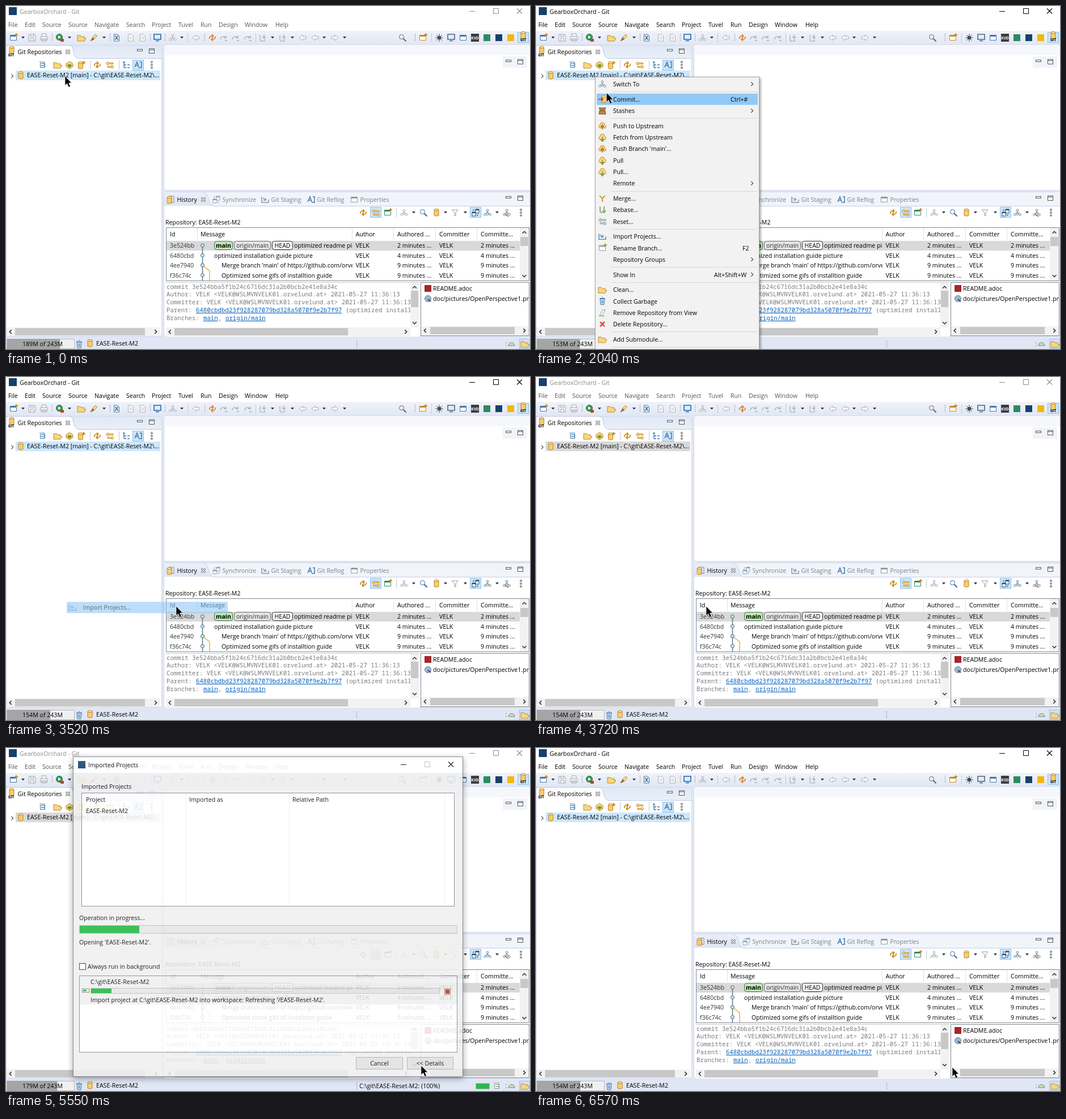
An HTML page that plays this animation: 924x606 px, repeating every 6.77 s.

```html
<!DOCTYPE html>
<html lang="en">
<head>
<meta charset="utf-8">
<title>Import projects</title>
<style>
html, body { margin: 0; width: 100%; height: 100%; overflow: hidden; background: #fff; }
svg#stage { display: block; width: 100vw; height: 100vh; }
text { font: 10.6px "Open Sans", "Noto Sans", sans-serif; white-space: pre; }
.b { font-weight: 700; }
.h { font-size: 11.4px; font-weight: 700; }
.m { font: 10.72px "Noto Sans Mono", monospace; }
.u { text-decoration: underline; }
.tiny { font-size: 6.5px; font-weight: 700; }
#menu { filter: drop-shadow(2px 2px 2px #0006); }
#wizard, #progress { filter: drop-shadow(0 3px 6px #0006); }
</style>
</head>
<body>
<svg id="stage" viewBox="0 0 924 606" xmlns="http://www.w3.org/2000/svg"></svg>
<script>
const LOOP = 6770, REPO = 'EASE-Reset-M2', USER = 'VELK', NAVY = '#17406b';
const GRAY = '#a6abb0', BLUE = '#3f78ad', GOLD = '#c98a1b';

// drawing helpers
const esc = s => s.replace(/&/g, '&amp;').replace(/</g, '&lt;');
const text = (x, y, s, fill = '#000', cls = '', more = '') =>
  `<text x="${x}" y="${y}" fill="${fill}" class="${cls}" ${more}>${esc(s)}</text>`;
const mid = (x, y, s, fill, cls) => text(x, y, s, fill, cls, 'text-anchor="middle"');
const rect = (x, y, w, h, fill, stroke = 'none', more = '') => {
  const o = stroke === 'none' ? 0 : .5;
  return `<rect x="${x + o}" y="${y + o}" width="${w - 2 * o}" height="${h - 2 * o}" fill="${fill}" stroke="${stroke}" ${more}/>`;
};
const path = (d, stroke = '#000', fill = 'none', w = 1, more = '') =>
  `<path d="${d}" stroke="${stroke}" fill="${fill}" stroke-width="${w}" ${more}/>`;
const dot = (x, y, r, fill, stroke = 'none') =>
  `<circle cx="${x}" cy="${y}" r="${r}" fill="${fill}" stroke="${stroke}"/>`;
const at = (x, y, body) => `<g transform="translate(${x} ${y})">${body}</g>`;
const clip = (x, y, w, h, body) =>
  `<svg x="${x}" y="${y}" width="${w}" height="${h}" viewBox="${x} ${y} ${w} ${h}" overflow="hidden">${body}</svg>`;
const vline = (x, y1, y2, c = '#e0e0e0') => path(`M${x + .5} ${y1}V${y2}`, c);
const hline = (y, x1, x2, c = '#d7d7d7') => path(`M${x1} ${y + .5}H${x2}`, c);
const chevron = (x, y, a, c = '#444', w = 1.2) =>
  `<g transform="translate(${x} ${y}) rotate(${a})">${path('M-1.7-3.4L1.7 0L-1.7 3.4', c, 'none', w)}</g>`;
const drop = (x, y) => path(`M${x - 3} ${y - 2}h6l-3 3.5z`, 'none', '#333');
const grip = (x, y) => path(`M${x + .5} ${y - 7}v14`, '#8f98a3', 'none', 1.4, 'stroke-dasharray="1.5 2"');

const icons = {
  cyl: () => path('M-4-5v10q4 2.500 8 0v-10z', '#bd8420', '#f8cd6d') +
    '<ellipse cy="-5" rx="4" ry="1.6" fill="#fdebbb" stroke="#bd8420"/>',
  cylAdd: () => at(-1.5, 1, icons.cyl()) + path('M4-7v6M1-4h6', '#d98b1b', 'none', 1.8),
  cylGet: () => path('M-6-2l6-4 6 4v5l-6 4-6-4z', '#bd8420', '#f8d67d') + path('M-3-1h6v2h2l-5 4-5-4h2z', 'none', '#6f9c3d'),
  page: c => path('M-4.500-6h6l3 3v9h-9z', c, '#fff') + path('M-2.500-1h5M-2.500 2h5', c),
  log: () => path('M-4-5h9v11h-9z', '#8a7a55', '#fff') + path('M-1-2h4M-1 1h4M-1 4h4', BLUE) + at(-3, 2, icons.cyl()).replace('<g ', '<g opacity=".9" '),
  win: c => path('M-5.500-4.500h11v9h-11z', c, '#fff') + path('M-5.500-3h11', c, 'none', 2),
  newWin: c => icons.win(c) + path('M5-8v6M2-5h6', GOLD, 'none', 1.8),
  collapse: c => path('M-5-5h9v9M-3.500-2.500h8v7h-8z', c, '#fff') + path('M-2 1h5', c, 'none', 1.4),
  disk: c => path('M-6-6h10l2 2v10h-12zM-3-6v4h6v-4M-3 6v-5h6v5', c, '#f4f4f4'),
  print: c => path('M-4-2v-5h8v5M-6-2h12v6h-12zM-4 2h8v4h-8z', c, '#f4f4f4'),
  folder: () => path('M-7 6v-10h5l2 2h5v3h3l-3 5z', '#b98b35', '#f8d67d'),
  run: () => dot(-1, -1, 5.5, '#2e9e52', '#1d7038') + path('M-3-4l5 3-5 3z', 'none', '#fff') + rect(1, 2, 6, 5, '#b5452c'),
  brush: () => path('M-6 6l4-7 5-5 3 3-5 5z', '#b98b35', '#f7d98b') + path('M-6 6l4-7 3 4z', 'none', '#8a6a4a'),
  sync: c => path('M-5 2a5 4 0 0 1 6-5M5-2a5 4 0 0 1-6 5M-1-6l3 3-3 3M1 6l-3-3 3-3', c, 'none', 1.6),
  swap: c => path('M6-3.500h-9v-2l-4 3 4 3v-2h9zM-4 2.500h8v-2l3 3-3 3v-2h-8z', c, '#fbe2a6'),
  tree: c => path('M-6-5h4M-4-5v10M-4 0h4M-4 5h4M2 0h4M2 5h4', c, 'none', 1.4),
  compare: c => path('M-6-1h6v7h-6zM0-6h6v7h-6z', c, '#fff') + path('M-6 0h6M0-5h6', c, 'none', 2) + path('M-4-3v-2h2M4 3v2h-2', c),
  branch: c => path('M0-5v4M-5 3l5-4 5 4', c) + [[0, -4], [-4.5, 3.5], [4.5, 3.5], [0, 2.5]]
    .map(([x, y]) => dot(x, y, 1.8, '#fff', c)).join(''),
  find: c => dot(-1.5, -1.5, 4, 'none', c) + path('M1.500 1.500l5 5', c, 'none', 2),
  bug: c => dot(0, 0, 3.2, c) + path('M0-7v14M-7 0h14M-5-5l10 10M5-5l-10 10', c),
  mon: c => path('M-6-6h12v9h-12zM-3 5.500h6', c, '#dbeeff', 1.6),
  back: c => path('M6-2h-6v-3l-6 5 6 5v-3h6z', c, '#fff'),
  fwd: c => path('M-6-2h6v-3l6 5-6 5v-3h-6z', c, '#fff'),
  step: c => path('M-6 3a5 5 0 0 1 9-3M4-4v4h-4M2 5h4', c, 'none', 1.3),
  fetch: c => path('M-5-5v8q0 3 3 3h5v-4M2-6v6M-1-2l3 3 3-3', c, 'none', 1.2),
  up: () => icons.cloud() + path('M0 7v-5h-3l3-4 3 4h-3', '#8b4e18', '#f3a534'),
  down: () => icons.cloud() + path('M0-1v5h-3l3 4 3-4h-3', '#4b7c28', '#a3c94f'),
  cloud: () => path('M-5 4a3.500 3.500 0 0 1 1-6a4 4 0 0 1 8 0a3.500 3.500 0 0 1 1 6z', '#c8922e', '#f8d67d'),
  merge: c => path('M-5-5l5 5 5-5M0 0v6', c, 'none', 2),
  rebase: c => path('M-4-6v7q0 4 4 4M3-6v9M0 1l3 4 3-4', c, 'none', 1.8),
  trash: c => path('M-4-4h8l-1 10h-6zM-5-5h10M-1-7h2M-1-2v6M1-2v6', c, '#d5e4f2'),
  x: c => path('M-4-4l8 8M4-4l-8 8', c, 'none', 2.6),
  stash: () => path('M-6-5h12l-2 4h-8zM-6 6h12l-1-6h-10z', '#7b4a20', '#c08447'),
  enter: () => at(3, 0, icons.cyl()) + path('M-7 0h8M-2-3l3 3-3 3', '#c0392b', 'none', 1.6),
  load: c => path('M-6-5v10h12v-5M-4-3l5 4M1-3v4h-4', c, 'none', 1.5),
  erase: c => path('M-5 5l6-10h4l-5 10z', c, '#fff') + path('M-6 6h10', c),
  filter: c => path('M-6-5h11l-4 5v5l-2 1v-6z', c, '#fff'),
  square: c => rect(-6, -6, 12, 12, c),
  disc: c => dot(0, 0, 5.5, c, '#5f7d99'),
  link: c => path('M-6 4l4-9 3 9M-5 1h5M3-5h3v10h-5', c, 'none', 1.5)
};
const icon = (name, x, y, c = GRAY) => at(x, y, icons[name](c));
const row = (y, list) => list.map(([n, x, c]) =>
  n === 'drop' ? drop(x, y) : n === 'grip' ? grip(x, y) : n === 'sep' ? vline(x, y - 8, y + 8, '#c3c9d2') : icon(n, x, y, c)).join('');
const dots = (x, y) => [-5, 0, 5].map(d => dot(x, y + d, 1.4, '#fff', '#555')).join('');
const minMax = (x, y) => rect(x - 5, y - 2, 10, 4, '#fff', '#555') + rect(x + 16, y - 3, 10, 9, '#fff', '#555') + hline(y - 1, x + 16, x + 26, '#555');
const toggle = (x, y) => rect(x, y, 20, 19, '#cce4f7', '#90c2ea');
const tabClose = (x, y) => {
  const d = `M${x - 3.5} ${y - 3.5}l7 7m0-7l-7 7`;
  return path(d, '#555', 'none', 2.8) + path(d, '#fff', 'none', 1.1);
};

// widgets
const scroll = (x, y, w, h, from, to) => {
  const flat = w > h, cx = x + w / 2, cy = y + h / 2;
  return rect(x, y, w, h, '#f2f2f2') + (flat
    ? rect(from, y + 1, to - from, h - 2, '#c8c8c8') + chevron(x + 7, cy, 180, '#333', 1.6) + chevron(x + w - 8, cy, 0, '#333', 1.6)
    : rect(x + 1, from, w - 2, to - from, '#c8c8c8') + chevron(cx, y + 8, -90, '#333', 1.6) + chevron(cx, y + h - 8, 90, '#333', 1.6));
};
const controls = (x, y, cs) =>
  path(`M${x - 5} ${y + .5}h10`, cs[0]) + path(`M${x + 37.5} ${y - 4.5}h9v9h-9z`, cs[1]) +
  path(`M${x + 79} ${y - 4.5}l9 9m0-9l-9 9`, cs[2], 'none', 1.1);
const button = (x, y, w, s, state = '') =>
  rect(x, y, w, 22, state === 'off' ? '#ccc' : '#e1e1e1', state === 'off' ? '#bfbfbf' : state ? '#0078d7' : '#adadad') +
  (state === 'main' ? rect(x + 1, y + 1, w - 2, 20, 'none', '#0078d7') : '') +
  mid(x + w / 2, y + 15, s, state === 'off' ? '#838383' : '#000');
const check = (x, y, s, on, fill) => rect(x, y, 12, 12, '#fff', '#333') +
  (on ? path(`M${x + 2.5} ${y + 6}l2.500 3 4.500-6`, '#222', 'none', 1.3) : '') + text(x + 15, y + 10, s, fill);

function mainWindow() {
  let s = rect(0, 0, 924, 606, '#fff') + rect(0, 44, 924, 25, 'url(#bar)') + rect(0, 68, 924, 538, '#e1e6f4');
  s += rect(5, 2, 14, 14, NAVY);
  s += `<g id="title">${text(24, 14, 'GearboxOrchard - Git', 'currentColor')}${controls(822, 9, Array(3).fill('currentColor'))}</g>`;
  const bar = { 4: 'File', 33: 'Edit', 64: 'Source', 110: 'Source', 156: 'Navigate', 212: 'Search', 257: 'Project',
    304: 'Tuvel', 343: 'Run', 375: 'Design', 421: 'Window', 475: 'Help' };
  s += `<g id="menubar">${Object.entries(bar).map(([x, n]) => text(x, 37, n, 'currentColor')).join('')}</g>`;
  s += row(56, [['newWin', 13, BLUE], ['drop', 30], ['disk', 46], ['print', 67], ['grip', 81], ['run', 95], ['drop', 112],
    ['folder', 133], ['brush', 155], ['drop', 173], ['grip', 183], ['page', 195, BLUE], ['page', 220], ['page', 241],
    ['grip', 254], ['mon', 267, '#2563a8'], ['grip', 280], ['branch', 294], ['drop', 310], ['sep', 320], ['back', 335],
    ['grip', 350], ['sync', 364, '#d9822b'], ['step', 384], ['step', 405], ['step', 427], ['sep', 440], ['fetch', 453],
    ['drop', 470], ['fetch', 488], ['drop', 505], ['back', 523], ['back', 545], ['drop', 561], ['fwd', 580], ['drop', 597],
    ['find', 699, '#666'], ['grip', 721], ['newWin', 735, GOLD], ['sep', 750], ['bug', 764, '#39505f'], ['mon', 785, '#536575'],
    ['win', 806, BLUE], ['square', 848, '#2c8a62'], ['square', 869, NAVY], ['square', 890, '#f0b90b']]);
  s += mid(195, 60, 'X', BLUE, 'b') + rect(820, 49, 14, 14, '#3a3d40') + mid(827, 58.5, 'KVD', '#fff', 'tiny');
  s += toggle(902, 46) + icon('cyl', 912, 52) + mid(912, 62, 'GIT', '#000', 'tiny');

  // repositories view
  s += rect(0, 69, 275, 515, '#fff', '#d3daea', 'rx="4"') + path('M112 70H274V92H127Q121 90 119 80T112 70z', 'none', 'url(#strip)');
  s += path('M0 69.500H112Q118 70 119 80T127 92.500H274', '#b9c7de');
  s += icon('cyl', 10, 78) + mid(9, 89, 'GIT', '#000', 'tiny');
  s += text(20.5, 85, 'Git Repositories') + tabClose(109, 81) + minMax(236, 78);
  s += toggle(223, 95) + row(104, [['collapse', 64, BLUE], ['folder', 91], ['cylGet', 112], ['cylAdd', 133], ['sep', 148], ['sync', 161, GOLD],
    ['swap', 183, GOLD], ['sep', 199], ['tree', 212, BLUE], ['link', 233, BLUE]]) + dots(257, 104);
  s += '<rect id="row" x="17" y="114" width="255" height="17"/>' + chevron(11, 124, 0, '#555') + icon('cyl', 26, 122.5);
  s += clip(30, 110, 242, 24, text(37, 126, `${REPO} [main] - C:\\git\\${REPO}\\...`));
  s += scroll(1, 568, 271, 15, 16, 245);

  // editor area
  s += rect(278, 68, 650, 258, '#fff', '#d3daea', 'rx="4"') + rect(280, 70, 644, 17, '#f5f7fb') + rect(876, 89, 43, 20, '#f0f3fa') + minMax(886, 97);

  // history view
  s += rect(278, 328, 650, 256, '#fff', '#d3daea', 'rx="4"') + rect(279, 329, 645, 24, '#f1f4fa');
  s += path('M279 353V334Q279 329 285 329H349Q355 330 357 340T366 353z', 'none', 'url(#tab)') + path('M349 329.500Q355 330 357 340T366 353.500H924', '#c5d0e4');
  s += icon('log', 291, 341) + text(301.5, 346, 'History') + tabClose(348, 342);
  [['compare', 371, '#8aa0b4', 'Synchronize'], ['load', 457, '#8b9aa5', 'Git Staging'], ['link', 538, BLUE, 'Git Reflog'], ['win', 614, '#8b9aa5', 'Properties']]
    .forEach(([n, x, c, label]) => s += icon(n, x, 342, c) + text(x + 10.5, 346, label, '#74858c'));
  s += minMax(886, 338) + toggle(642, 355) + toggle(818, 355);
  s += row(365, [['sync', 630, GOLD], ['swap', 652, GOLD], ['newWin', 673, '#2c8a62'], ['sep', 688], ['branch', 702], ['drop', 719],
    ['find', 736, '#31689b'], ['cyl', 759], ['drop', 775], ['filter', 792, '#999'], ['drop', 810], ['compare', 828, '#24507a'],
    ['branch', 849, '#65849c'], ['drop', 866], ['branch', 883, '#65849c']]) + path('M880 368l6 4', '#c04a3a', 'none', 1.5) + dots(908, 365);
  s += text(281, 386, 'Repository: ' + REPO) + rect(282, 391, 641, 95, '#fff', '#82878f');
  [[289, 'Id'], [343, 'Message'], [616.5, 'Author'], [690, 'Authored ...'], [764, 'Committer'], [837, 'Committe...']]
    .forEach(([x, n]) => s += text(x, 407, n));
  s += rect(283, 415, 623, 17, '#d9d9d9') + [338, 611, 684, 758, 831].map(x => vline(x - 1, 392, 414)).join('');
  s += path('M346.500 423V485', '#5b8296', 'none', 1.6) + path('M346.500 458L359 468V485', '#f0b04a', 'none', 1.6);
  [['3e524bb', 'optimized readme picture', 508, 2], ['6480cbd', 'optimized installation guide picture', 367, 4],
    ['4ee7940', "Merge branch 'main' of https://github.com/orvelund", 380, 9], ['f36c74c', 'Optimized some gifs of installtion guide', 380, 9]]
    .forEach(([id, msg, x, n], i) => {
      const y = 427 + i * 17.5, ago = n + ' minutes ...';
      s += text(289, y, id, '#333') + clip(340, 415, 271, 70, text(x, y, msg)) + text(616.5, y, USER) + text(690, y, ago) +
        text(764, y, USER) + text(837, y, ago) + dot(346.5, y - 4, 3, '#d5e0e6', '#49656f');
    });
  s += rect(367, 415, 33, 16, '#bfe5b5', '#3e7a46', 'rx="4"') + mid(383.5, 427, 'main', '#000', 'b') +
    rect(402, 415, 65, 16, '#e4e4e4', '#666', 'rx="4"') + mid(434.5, 427, 'origin/main', '#333') +
    rect(469, 415, 37, 16, '#fff', '#222', 'rx="4"') + mid(487.5, 427, 'HEAD');
  s += scroll(906, 392, 16, 93, 408, 424);

  // commit details
  s += rect(281, 488, 448, 96, '#fff') + hline(488, 281, 729, '#c8c8c8');
  const who = `${USER} <${USER}@WSLMVN${USER}01.orvelund.at> 2021-05-27 11:36:13`, mono = (x, y, t) => text(x, y, t, '#7d7d7d', 'm');
  const ref = (x, y, t) => text(x, y, t, '#0a64c0', 'm u');
  s += clip(281, 488, 432, 80, mono(283, 499.5, 'commit 3e524bba5f1b24c6716dc31a2b0bcb2e41e8a34c') + mono(283, 513, 'Author: ' + who) +
    mono(283, 527, 'Committer: ' + who) + mono(283, 541, 'Parent:') + ref(335, 541, '6480cbdbd23f928287079bd328a5070f9e2b7f97') +
    mono(599, 541, '(optimized installation') + mono(283, 555, 'Branches:') + ref(348, 555, 'main') + mono(374, 555, ',') + ref(387, 555, 'origin/main'));
  s += scroll(713, 489, 15, 79, 503, 532) + scroll(282, 568, 431, 15, 297, 603);
  s += rect(731, 488, 192, 95, '#fff', '#82878f') + icon('square', 744, 499, '#a3262a') + icon('disc', 744, 517, '#9db9d3') + path('M744 518l5 4', '#345', 'none', 2);
  s += clip(732, 489, 190, 76, text(753, 503, 'README.adoc') + text(753, 521, 'doc/pictures/OpenPerspective1.png'));
  s += scroll(732, 566, 190, 15, 748, 897);

  // status line
  s += rect(1, 588, 120, 18, '#f0f0f0', '#bbb') + '<rect id="used" x="2" y="588" height="18" fill="#a5a5a5"/>';
  s += '<text id="heap" x="29" y="601"></text>' + icon('trash', 129, 598, BLUE) + icon('cyl', 148, 596) + text(159, 600, REPO);
  s += grip(618, 598) + path('M886 600a5.500 5.500 0 0 1 11 0zM882 594v2M882 599v2', '#6d8d6d', '#c5dcc0') +
    rect(905, 588, 19, 18, '#cfe3f7', '#9cc2e8') + icon('folder', 915, 597);
  s += `<g id="job">${text(623, 601, `C:\\git\\${REPO}: (100%)`)}${rect(828, 592, 25, 11, '#2ab94b', '#bbb')}${icon('collapse', 865, 597, '#7c9a7c')}</g>`;
  return s;
}

// context menu: groups of [label, icon, colour, shortcut], where > opens a submenu
const menu = [
  [['Switch To', 'branch', '#6b8ca3', '>']],
  [['Commit...', 'enter', '', 'Ctrl+#'], ['Stashes', 'stash', '', '>']],
  [['Push to Upstream', 'up'], ['Fetch from Upstream', 'down'], ["Push Branch 'main'...", 'up'], ['Pull', 'down'], ['Pull...', 'down'], ['Remote', '', '', '>']],
  [['Merge...', 'merge', '#c9972f'], ['Rebase...', 'rebase', '#7fa36b'], ['Reset...', 'swap', '#6d9bb8']],
  [['Import Projects...', 'load', '#5d8fb8'], ['Rename Branch...', 'newWin', '#8a9aa8', 'F2'], ['Repository Groups', '', '', '>']],
  [['Show In', '', '', 'Alt+Shift+W>']],
  [['Clean...', 'folder'], ['Collect Garbage', 'trash', BLUE], ['Remove Repository from View', 'erase', '#8a9a8a'], ['Delete Repository...', 'x', '#dd4b39']],
  [['Add Submodule...', 'folder']]
];
const keyX = { 'Ctrl+#': 343, F2: 364, 'Alt+Shift+W': 314 };
const items = [], seps = [602];
let itemY = 138;
menu.forEach((group, g) => {
  if (g) seps.push(Math.round(itemY - 7));
  itemY += g ? 6.4 : 0;
  group.forEach(it => { items.push({ it, y: itemY }); itemY += 20.3; });
});
const band = (y, id = '') => `<rect ${id} x="107" y="${y - 10}" width="284" height="20" fill="#91c9f7"/>`;
function menuItem({ it: [label, ic, c, key = ''], y }) {
  const k = key.replace('>', '');
  return (ic ? icon(ic, 117, y, c) : '') + text(136, y + 4, label) + (k ? text(keyX[k], y + 4, k) : '') +
    (key.endsWith('>') ? chevron(381, y, 0) : '');
}
const contextMenu = () => rect(104, 125, 290, 490, '#f2f2f2', '#a6a6a6') + seps.map(y => hline(y, 133, 391)).join('') +
  band(0, 'id="hover"') + items.map(menuItem).join('');

function wizard() {
  let s = rect(71, 19, 801, 573, '#f0f0f0', '#6f7c88') + rect(72, 20, 799, 86, '#fff') + rect(770, 47, 101, 58, 'url(#glow)') + hline(106, 72, 871, '#a0a0a0');
  s += rect(80, 27, 13, 13, NAVY) + text(98, 38, 'Import Projects from File System or Archive') + controls(767, 33, ['#bbb', '#000', '#000']);
  s += text(77, 68, 'Import Projects from File System or Archive', '#000', 'h') +
    text(85, 89, 'This wizard analyzes the content of your folder or archive file to find projects and import them in the IDE.');
  s += path('M813 99V65q0-2 3-2h11l4 4h19q3 0 3 3v25z', '#b78a3c', '#f3d27c') + path('M820 73l28-5v20h-28z', '#ccc', '#fff') +
    path('M814 101l9-22q1-2 4-2l36-5-9 24q-1 2-3 2z', '#6f9fd0', '#9cc6ee');
  s += text(85, 140, 'Import source:') + rect(167, 125, 512, 22, '#fff', '#0078d7') + rect(172, 128, 109, 15, '#0078d7') +
    text(173, 139.5, 'C:\\git\\' + REPO, '#fff') + chevron(671, 136, 90) + button(685, 125, 83, 'Directory...') + button(774, 125, 83, 'Archive...');
  s += rect(85, 163, 618, 20, '#fff', '#7a7a7a') + text(90, 177, 'type filter text', '#444') + button(709, 164, 148, 'Select All', 'off') + button(709, 194, 148, 'Deselect All', 'off');
  s += rect(85, 187, 618, 102, '#f0f0f0', '#828790') + rect(86, 188, 616, 22, '#fff') + vline(546, 188, 210) + vline(685, 188, 210) +
    text(93, 204, 'Folder') + text(553, 204, 'Import as') + check(107, 213, ' ' + REPO, true, '#6d6d6d');
  s += text(709, 265, '1 of 1 selected') + check(708, 276, 'Hide already open projects');
  s += check(85, 295, 'Close newly imported projects upon completion') + text(85, 325, 'Use') +
    text(106, 325, 'installed project configurators', '#0066cc', 'u') + text(254, 325, 'to:') +
    check(85, 333, 'Search for nested projects', true) + check(85, 352, 'Detect and configure project natures', true);
  s += rect(86, 387, 772, 77, 'none', '#dcdcdc') + rect(91, 383, 68, 9, '#f0f0f0') + text(94, 391, 'Working sets') +
    check(97, 407, 'Add project to working sets') + button(762, 403, 83, 'New...') + text(97, 446, 'Working sets:', '#838383') +
    rect(167, 431, 589, 21, '#ccc', '#bfbfbf') + chevron(748, 442, 90, '#999') + button(762, 431, 83, 'Select...', 'off');
  s += text(858, 481, 'Show other specialized import wizards', '#0066cc', 'u', 'text-anchor="end"') + hline(543, 72, 871, '#a0a0a0');
  return s + button(513, 557, 82, '< Back', 'off') + button(597, 557, 83, 'Next >', 'off') + button(687, 557, 83, 'Finish', 'main') + button(778, 557, 82, 'Cancel');
}

function progress() {
  let s = rect(118, 15, 688, 566, '#f0f0f0', '#6f7c88') + rect(119, 16, 686, 28, '#fff');
  s += rect(127, 23, 13, 13, NAVY) + text(145, 34, 'Imported Projects') + controls(701, 29, ['#000', '#bbb', '#000']) + text(133, 72, 'Imported Projects');
  s += rect(133, 79, 658, 201, '#fff', '#828790') + [317, 499, 773].map(x => vline(x, 80, 279, '#ececec')).join('') +
    text(141, 95, 'Project') + text(323, 95, 'Imported as') + text(505, 95, 'Relative Path') + text(141, 115, REPO);
  s += text(129, 304, 'Operation in progress...') + rect(129, 313, 667, 15, '#e6e6e6', '#bcbcbc') + rect(130, 314, 105, 13, '#1fb83f') +
    text(129, 347, `Opening '${REPO}'.`) + check(129, 380, 'Always run in background');
  s += rect(129, 402, 667, 136, '#fff', '#828790') + rect(130, 403, 665, 50, '#f0f0f0') + text(149, 417, 'C:\\git\\' + REPO) +
    rect(149, 424, 616, 10, '#e6e6e6', '#bcbcbc') + rect(150, 425, 36, 8, '#1fb83f') + rect(134, 425, 13, 7, '#fff', '#777') + rect(136, 427, 6, 3, '#1fb83f') +
    rect(773, 425, 11, 11, '#f4e4dc', '#8a6a5a') + rect(775, 427, 7, 7, '#b23a1e') +
    text(149, 449, `Import project at C:\\git\\${REPO} into workspace: Refreshing '/${REPO}'.`);
  return s + button(617, 546, 83, 'Cancel') + button(707, 546, 82, '<< Details');
}

const gradient = (id, from, to, more = 'x2="0" y2="1"') =>
  `<linearGradient id="${id}" ${more}><stop stop-color="${from}"/><stop offset="1" stop-color="${to}"/></linearGradient>`;
const stage = document.getElementById('stage');
const importItem = items.find(i => i.it[0] === 'Import Projects...');
stage.innerHTML = `<defs>${gradient('bar', '#f0f3fa', '#e1e6f4')}${gradient('strip', '#dfe8f6', '#eaf0f9')}
  ${gradient('tab', '#eaeffa', '#dfe6f3')}${gradient('glow', '#fff', '#cfe0f5', 'x1=".3" y2=".6"')}</defs>
  ${mainWindow()}<g id="menu">${contextMenu()}</g><g id="chosen">${band(importItem.y)}${menuItem(importItem)}</g>
  <g id="wizard">${wizard()}</g><g id="progress">${progress()}</g>
  <g id="cursor">${path('M0 0V16.500L3.700 13L6.500 19.500L9.500 18.200L6.700 12H11.700z', '#fff', '#000', .7)}</g>`;

// stepped values: [start time, value]
const track = {
  active: [[0, 0], [820, 1], [3720, 0], [5140, 1], [5550, 0], [6160, 1]],
  focus: [[0, 1], [3720, 0], [5140, 1], [5550, 0], [6160, 1]],
  heap: [[0, 189], [200, 190], [820, 191], [1220, 153], [2052, 154], [3920, 158], [4320, 162], [4720, 165], [4920, 168],
    [5140, 171], [5340, 175], [5550, 179], [5750, 181], [5950, 184], [6370, 186], [6570, 154]],
  menu: [[0, 0], [1220, .5], [1440, 1], [3520, 0]],
  chosen: [[0, 0], [3520, .6], [3720, 0]],
  wizard: [[0, 0], [3920, .6], [4120, 1], [5140, 0]],
  progress: [[0, 0], [5550, .87], [5750, 1], [5950, .4], [6160, 0]],
  job: [[0, 0], [5340, 1], [6370, 0]]
};
const value = (name, t) => track[name].reduce((v, [start, x]) => t >= start ? x : v, 0);
const moves = [
  { from: 1840, gap: 212.5, n: 5, to: [300, 405] },
  { from: 4320, gap: 200, n: 3, to: [733, 558] },
  { from: 5340, gap: 200, n: 1, to: [732, 561] },
  { from: 6160, gap: 200, n: 1, to: [734, 564] }
];
function pointer(t) {
  let x = 104, y = 124;
  for (const { from, gap, n, to } of moves) {
    const k = Math.max(0, Math.min(n, Math.floor((t - from) / gap) + 1)) / n, e = k * k * (3 - 2 * k);
    x += (to[0] - x) * e;
    y += (to[1] - y) * e;
  }
  return [x, y];
}

const el = id => document.getElementById(id);
const set = (id, name, v) => el(id).setAttribute(name, v);

function draw(t) {
  const [x, y] = pointer(t), heap = value('heap', t), active = value('active', t);
  set('title', 'color', active ? '#000' : '#8c8c8c');
  set('menubar', 'color', active ? '#000' : '#555');
  set('row', 'fill', value('focus', t) ? '#cce8ff' : '#d9d9d9');
  set('used', 'width', heap / 243 * 120);
  el('heap').textContent = heap + 'M of 243M';
  for (const id of ['menu', 'chosen', 'wizard', 'progress', 'job']) {
    const v = value(id, t);
    set(id, 'opacity', v);
    set(id, 'visibility', v ? 'visible' : 'hidden');
  }
  const over = t >= 1840 && t < 3520 && items.find(i => Math.abs(i.y - y) <= 13.4);
  set('hover', 'opacity', over ? 1 : 0);
  if (over) set('hover', 'y', over.y - 10);
  set('cursor', 'transform', `translate(${x} ${y})`);
}

const start = performance.now();
function tick() {
  draw((performance.now() - start) % LOOP);
  requestAnimationFrame(tick);
}
tick();
</script>
</body>
</html>
```
